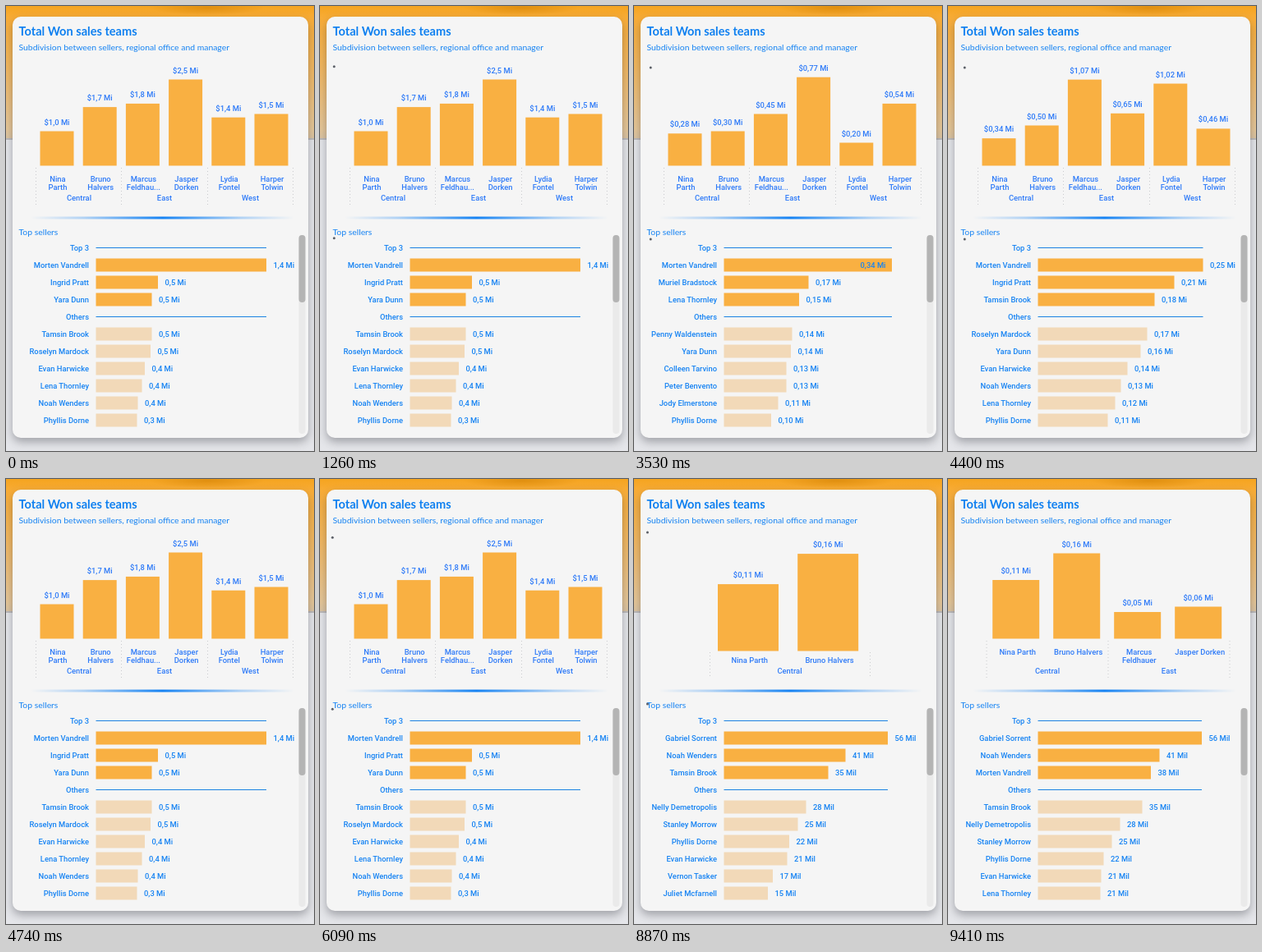
These frames come from a looping animation (375 by 542 pixels, 9940 ms). An HTML page:

```html
<!DOCTYPE html>
<html lang="en">
<head>
<meta charset="utf-8">
<title>Total Won sales teams</title>
<style>
  html, body { margin: 0; width: 100%; height: 100%; overflow: hidden; }
  body { position: relative; background: #e5e6ea; }
  .band {
    position: absolute; left: 0; top: 0; width: 375px; height: 161px;
    background:
      radial-gradient(ellipse 70px 9px at 245px 2px, #e08f10 0, #e08f1000 100%),
      linear-gradient(#f5a41f 0, #f8ac36 14px, #f3b65c 70px, #e6c698 150px, #dcc4a2 100%);
    border-bottom: 2px solid #bdbabb;
  }
  .card {
    position: absolute; left: 8px; top: 13px; width: 360px; height: 513px;
    border-radius: 10px; background: #f5f5f5;
    box-shadow: 0 5px 11px rgba(50, 52, 60, .38);
  }
  svg { position: absolute; left: 0; top: 0; display: block; }
  text { font: 500 9.4px Roboto, "Liberation Sans", sans-serif; fill: #1683f3; }
  .chart text { fill: #2f7bf8; }
  .head { font: 10.4px Lato, "Open Sans", sans-serif; }
  .title { font: 700 14.6px Lato, "Open Sans", sans-serif; fill: #0f80f0; }
  .mid { text-anchor: middle; }
  .end { text-anchor: end; }
  .bar { fill: #f9b042; }
  .pale { fill: #f2d9b8; }
  .rule { stroke: #1a82e2; stroke-width: 1; }
  .sep { stroke: #c9cacd; stroke-width: 1; stroke-dasharray: 1 3; }
  .dot { fill: #5c6068; }
</style>
</head>
<body>
<div class="band"></div>
<div class="card"></div>
<svg id="stage" width="375" height="542" viewBox="0 0 375 542">
  <defs>
    <linearGradient id="glow">
      <stop offset="0" stop-color="#1683f3" stop-opacity="0"/>
      <stop offset=".2" stop-color="#1683f3" stop-opacity=".3"/>
      <stop offset=".5" stop-color="#1683f3"/>
      <stop offset=".8" stop-color="#1683f3" stop-opacity=".3"/>
      <stop offset="1" stop-color="#1683f3" stop-opacity="0"/>
    </linearGradient>
  </defs>
  <text class="title" x="15.5" y="35.5">Total Won sales teams</text>
  <text class="head" x="15.5" y="53.5">Subdivision between sellers, regional office and manager</text>
  <rect x="30" y="256.5" width="321" height="3" rx="1.5" fill="url(#glow)"/>
  <text class="head" x="15.5" y="278.5">Top sellers</text>
  <rect x="356.5" y="279" width="8" height="242" rx="4" fill="#eaeaea"/>
  <rect x="356.5" y="279" width="8" height="82" rx="4" fill="#b4b4b4"/>
</svg>
<script>
const NS = 'http://www.w3.org/2000/svg';
const stage = document.getElementById('stage');

function add(parent, tag, attrs, content) {
  const el = document.createElementNS(NS, tag);
  for (const key in attrs) el.setAttribute(key, attrs[key]);
  if (content !== undefined) el.textContent = content;
  parent.appendChild(el);
  return el;
}

const label = (g, x, y, content, cls) => add(g, 'text', { x, y, class: cls || '' }, content);
const money = (v, digits, unit) => v.toFixed(digits).replace('.', ',') + ' ' + unit;

// Column chart layouts: first bar, pitch, bar width, base line, names
const WIDE = {
  x: 41.5, pitch: 52.2, w: 41, base: 194.5, shift: 1,
  names: ['Nina/Parth', 'Bruno/Halvers', 'Marcus/Feldhau...', 'Jasper/Dorken', 'Lydia/Fontel', 'Harper/Tolwin'],
  regions: [['Central', 89], ['East', 193], ['West', 297.5]],
  seps: [36.5, 140.5, 245.5, 349.5], sepTop: 197
};
const PAIR = {
  x: 102, pitch: 97.2, w: 74, base: 209.5, shift: 1.8,
  names: ['Nina Parth', 'Bruno Halvers'],
  regions: [['Central', 189.5]], seps: [92.5, 287.5], sepTop: 211
};
const QUAD = {
  x: 54.2, pitch: 74, w: 57, base: 194.5, shift: 2,
  names: ['Nina Parth', 'Bruno Halvers', 'Marcus/Feldhauer', 'Jasper Dorken'],
  regions: [['Central', 121], ['East', 269]], seps: [47, 195, 343], sepTop: 197
};

const S = {
  morten: 'Morten Vandrell', ingrid: 'Ingrid Pratt', yara: 'Yara Dunn', tamsin: 'Tamsin Brook',
  rose: 'Roselyn Mardock', evan: 'Evan Harwicke', lena: 'Lena Thornley', noah: 'Noah Wenders',
  phyl: 'Phyllis Dorne', gabe: 'Gabriel Sorrent', jody: 'Jody Elmerstone', muriel: 'Muriel Bradstock',
  penny: 'Penny Waldenstein', colleen: 'Colleen Tarvino', peter: 'Peter Benvento',
  nelly: 'Nelly Demetropolis', stan: 'Stanley Morrow', vern: 'Vernon Tasker', juliet: 'Juliet Mcfarnell'
};

// cols: values, pixels per unit, decimals, unit
// list: seller keys, bar widths, value of the longest bar, decimals, unit
const total = {
  kind: WIDE, cols: [[1, 1.7, 1.8, 2.5, 1.4, 1.5], 42, 1, 'Mi'],
  list: ['morten ingrid yara tamsin rose evan lena noah phyl',
    [207.5, 75.5, 68, 68, 66.5, 59.5, 56, 51, 50], 1.43, 1, 'Mi']
};
const views = [
  total,
  { kind: WIDE, cols: [[.38, .9, .28, 1.08, .18, .5], 95, 2, 'Mi'],
    list: ['morten tamsin yara noah gabe evan phyl rose jody',
      [202.5, 63.5, 54.5, 51, 49, 46.5, 43, 39, 33], .81, 2, 'Mi'] },
  { kind: WIDE, cols: [[.28, .3, .45, .77, .2, .54], 140, 2, 'Mi'], inside: true,
    list: ['morten muriel lena penny yara colleen peter jody phyl',
      [204.5, 103, 91.5, 83, 81.5, 76, 76, 66, 57.5], .34, 2, 'Mi'] },
  { kind: WIDE, cols: [[.34, .5, 1.07, .65, 1.02, .46], 98, 2, 'Mi'],
    list: ['morten ingrid tamsin rose yara evan noah lena phyl',
      [201, 166, 142, 133, 125, 109, 101, 94, 85], .25, 2, 'Mi'] },
  total,
  { kind: PAIR, cols: [[52, 74], 1.62, 0, 'Mil'],
    list: ['gabe noah nelly tamsin stan phyl evan vern juliet',
      [190, 160, 104, 98, 90, 77, 70, 64, 57], 27, 0, 'Mil'] },
  { kind: PAIR, cols: [[89, 130], .927, 0, 'Mil'],
    list: ['gabe noah tamsin nelly stan phyl evan vern juliet',
      [193, 173, 97.5, 92, 85, 72, 71.5, 67, 57], 46, 0, 'Mil'] },
  { kind: PAIR, cols: [[.11, .16], 740, 2, 'Mi'],
    list: ['gabe noah tamsin nelly stan phyl evan vern juliet',
      [199.5, 148, 127, 100, 90, 79.5, 77, 59.5, 53.5], 55.55, 0, 'Mil'] },
  { kind: QUAD, cols: [[.11, .16, .05, .06], 650, 2, 'Mi'],
    list: ['gabe noah morten tamsin nelly stan phyl evan lena',
      [199.5, 148, 137.5, 127, 100, 90, 80, 77, 76], 55.55, 0, 'Mil'] }
];

function drawColumns(g, kind, [values, scale, digits, unit]) {
  kind.seps.forEach(x => add(g, 'line', { x1: x, x2: x, y1: kind.sepTop, y2: 242, class: 'sep' }));
  values.forEach((v, i) => {
    const x = kind.x + i * kind.pitch, mid = x + kind.w / 2;
    const h = v * scale, top = kind.base - h;
    add(g, 'rect', { x, y: top, width: kind.w, height: h, class: 'bar' });
    label(g, mid, top - 8, '$' + money(v, digits, unit), 'mid');
    kind.names[i].split('/').forEach((part, row) =>
      label(g, mid + kind.shift, (kind === PAIR ? 224 : 214) + row * 10, part, 'mid'));
  });
  kind.regions.forEach(([name, x]) => label(g, x, 237.3, name, 'mid'));
}

function drawList(g, [keys, widths, top, digits, unit], inside) {
  const left = 109.5, max = widths[0];
  const heading = (y, name) => {
    label(g, 101, y + 3.2, name, 'end');
    add(g, 'line', { x1: left, x2: left + max, y1: y - .5, y2: y - .5, class: 'rule' });
  };
  heading(295, 'Top 3');
  heading(379, 'Others');
  keys.split(' ').forEach((key, i) => {
    const w = widths[i], y = 316 + 21 * (i < 3 ? i : i + 1);
    const value = money(w / max * top, digits, unit);
    label(g, 101, y + 3.2, S[key], 'end');
    add(g, 'rect', { x: left, y: y - 8.5, width: w, height: 16, class: i < 3 ? 'bar' : 'pale' });
    if (inside && i === 0) label(g, left + w - 7.5, y + 3.2, value, 'end');
    else label(g, left + w + 8.5, y + 3.2, value);
  });
}

const groups = views.map(view => {
  const g = add(stage, 'g', { visibility: 'hidden' });
  drawColumns(add(g, 'g', { class: 'chart' }), view.kind, view.cols);
  drawList(add(g, 'g', {}), view.list, view.inside);
  return g;
});
const dots = [69, 278].map(cy => ({ cy, el: add(stage, 'circle', { r: 1.5, class: 'dot' }) }));

// Each view stays until its reload ends; a dot circles while it reloads
const LOOP = 9940;
const reloads = [[1190, 1330], [2320, 2470], [3530, 3670], [4400, 4740],
  [5950, 6160], [6760, 6970], [7700, 8040], [8590, 8940]];

function draw(now) {
  const t = now % LOOP;
  const current = reloads.filter(r => t >= r[1]).length;
  groups.forEach((g, i) => g.setAttribute('visibility', i === current ? 'visible' : 'hidden'));
  const next = reloads[current];
  const busy = next && t >= next[0];
  const step = busy ? Math.floor((t - next[0]) / 70) : 0;
  const angle = (95 + step * 32) * Math.PI / 180;
  dots.forEach(({ cy, el }) => {
    el.setAttribute('visibility', busy ? 'visible' : 'hidden');
    el.setAttribute('cx', 20.8 + 6 * Math.cos(angle));
    el.setAttribute('cy', cy + 6 * Math.sin(angle));
  });
}

const start = performance.now();
function tick() {
  draw(performance.now() - start);
  requestAnimationFrame(tick);
}
tick();
</script>
</body>
</html>
```
